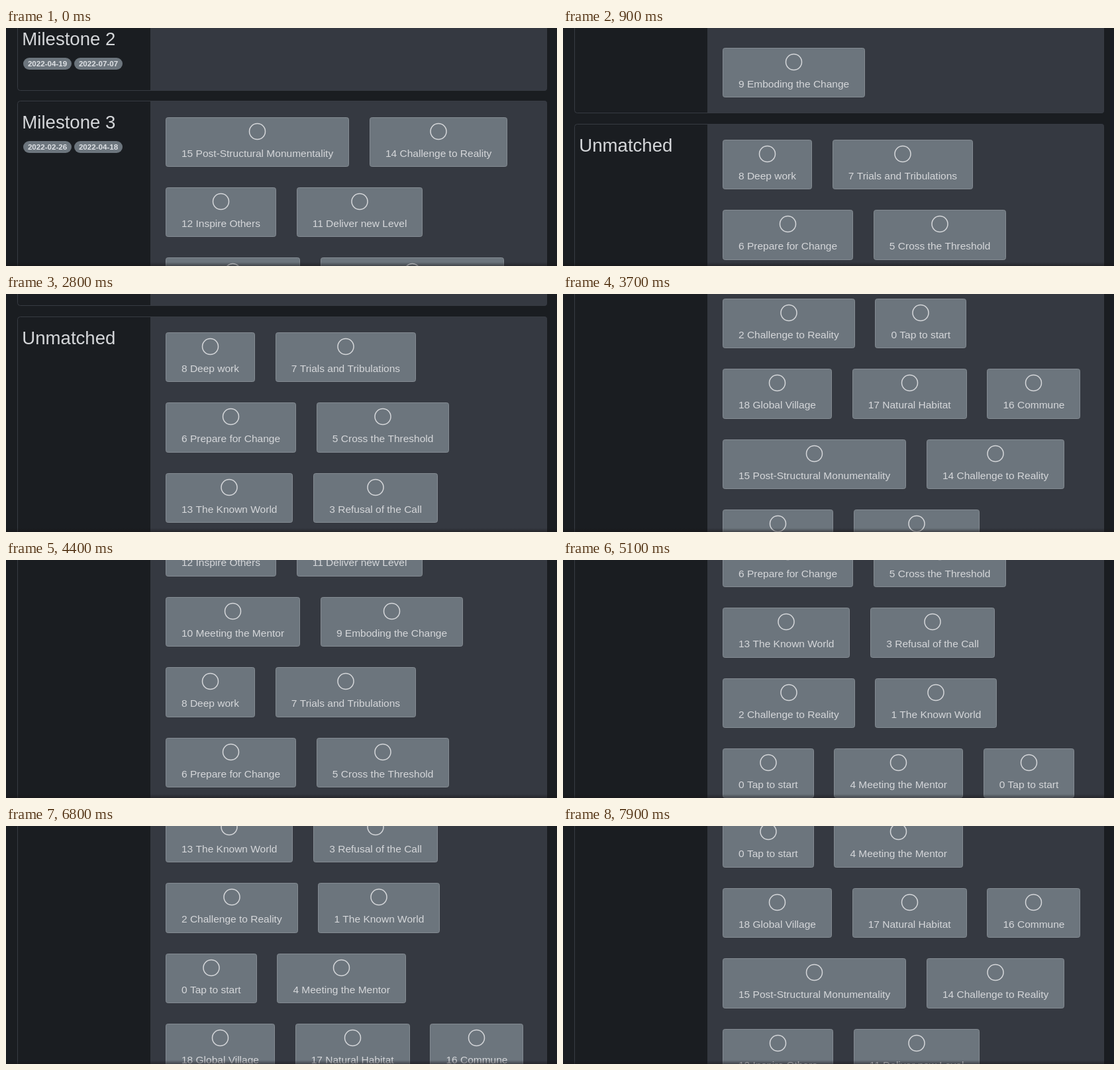
Animation, 832 px wide and 360 px high, one loop 8000 ms. Source, as an HTML page with a canvas:

```html
<!DOCTYPE html>
<html lang="en">
<head>
<meta charset="utf-8">
<title>Milestones</title>
<style>
html, body { margin: 0; width: 100%; height: 100%; overflow: hidden; background: #1a1d21; }
canvas { display: block; }
</style>
</head>
<body>
<canvas id="stage" width="832" height="360"></canvas>
<script>
const ctx = document.getElementById('stage').getContext('2d');
const FAMILY = '"Liberation Sans", Arial, sans-serif';
const CARD_FONT = '15.5px ' + FAMILY;
const TITLE_FONT = '27.6px ' + FAMILY;
const BADGE_FONT = 'bold 11.6px ' + FAMILY;
const PAGE = '#1a1d21', BODY = '#353941', CARD = '#6c757d', EDGE = '#848b92', INK = '#d5d7da';
const LOOP = 8000, STEP = 100;
const PITCH = 106.4, CARD_H = 75.5, PAD = 24.2, GAP = 30.8, LEFT = 241, RIGHT = 795;

const issues = [
  '18 Global Village', '17 Natural Habitat', '16 Commune',
  '15 Post-Structural Monumentality', '14 Challenge to Reality',
  '12 Inspire Others', '11 Deliver new Level',
  '10 Meeting the Mentor', '9 Emboding the Change',
  '8 Deep work', '7 Trials and Tribulations',
  '6 Prepare for Change', '5 Cross the Threshold',
  '13 The Known World', '3 Refusal of the Call',
  '2 Challenge to Reality', '1 The Known World',
  '0 Tap to start', '4 Meeting the Mentor'
];
const tap = issues[17];

// Flow cards from left to right, wrapping at the panel's edge.
function flow(labels) {
  ctx.font = CARD_FONT;
  let x = LEFT, row = 0;
  return labels.map(label => {
    const w = ctx.measureText(label).width + 48;
    if (x > LEFT && x + w > RIGHT) { x = LEFT; row++; }
    const card = { label, x, w, row };
    x += w + GAP;
    return card;
  });
}

const panels = [
  { title: 'Milestone 2', top: -16, bottom: 95.2, dates: ['2022-04-19', '2022-07-07'], cards: [] },
  { title: 'Milestone 3', top: 110.8, bottom: 553.4, dates: ['2022-02-26', '2022-04-18'],
    cards: flow([...issues.slice(3, 8), '13 Post-Structural Monumentality', issues[8]]) },
  { title: 'Unmatched', top: 569, bottom: 5200, dates: [],
    cards: flow([...issues.slice(9, 16), tap, ...issues, tap, ...issues, ...issues, ...issues]) }
];

// [time, scroll position, eased]
const keys = [
  [0, 0], [400, 212, true], [500, 212], [900, 424, true],
  [1500, 424], [1900, 530, true], [2700, 530], [2800, 535],
  [3000, 636], [3100, 636], [3700, 905.2], [4000, 1104],
  [4900, 1504], [5100, 1584.6], [6800, 2634.6], [7000, 3034],
  [7100, 3034], [7300, 3245], [7400, 3245], [7900, 3797.4]
];

function scrollAt(t) {
  const i = keys.findIndex(k => k[0] >= t);
  if (i <= 0) return keys[0][1];
  const [t0, y0] = keys[i - 1], [t1, y1, eased] = keys[i];
  let p = (t - t0) / (t1 - t0);
  if (eased) p = p * p * (3 - 2 * p);
  return y0 + (y1 - y0) * p;
}

function box(x, y, w, h, r, fill, stroke) {
  ctx.beginPath();
  ctx.roundRect(x, y, w, h, r);
  if (fill) { ctx.fillStyle = fill; ctx.fill(); }
  if (stroke) { ctx.strokeStyle = stroke; ctx.lineWidth = 1; ctx.stroke(); }
}

function write(text, x, y, font, color) {
  ctx.font = font;
  ctx.fillStyle = color;
  ctx.fillText(text, x, y);
}

function drawCard(card, y) {
  const top = Math.floor(y), h = Math.floor(y + CARD_H) - top;
  const x = Math.round(card.x), w = Math.round(card.x + card.w) - x;
  box(x + 0.5, top + 0.5, w - 1, h - 1, 3, CARD, EDGE);
  ctx.beginPath();
  ctx.arc(x + w / 2, top + 21.5, 12, 0, Math.PI * 2);
  ctx.strokeStyle = INK;
  ctx.lineWidth = 1.5;
  ctx.stroke();
  write(card.label, card.x + 24, top + 60, CARD_FONT, INK);
}

function drawPanel(panel, scroll) {
  const top = Math.floor(panel.top - scroll), bottom = Math.floor(panel.bottom - scroll);
  if (bottom < 0 || top > 360) return;
  box(218, top, 599, bottom - top, [0, 4, 4, 0], BODY);
  box(17.5, top + 0.5, 799, bottom - top - 1, 4, null, '#373b42');
  write(panel.title, 24.3, top + 42, TITLE_FONT, INK);
  panel.dates.forEach((date, i) => {
    const x = 26 + i * 77;
    box(x, top + 61, 73, 18, 9, CARD);
    write(date, x + 6.9, top + 74, BADGE_FONT, '#dde0e4');
  });
  for (const card of panel.cards) {
    const y = panel.top + PAD + card.row * PITCH - scroll;
    if (y > -80 && y < 361) drawCard(card, y);
  }
}

const shade = ctx.createLinearGradient(0, 354, 0, 360);
shade.addColorStop(0, 'rgba(22,20,22,0)');
shade.addColorStop(1, 'rgba(22,20,22,0.5)');

function draw(now) {
  const t = Math.floor((now % LOOP) / STEP) * STEP;
  const scroll = scrollAt(t);
  ctx.fillStyle = PAGE;
  ctx.fillRect(0, 0, 832, 360);
  panels.forEach(panel => drawPanel(panel, scroll));
  ctx.fillStyle = shade;
  ctx.fillRect(0, 354, 832, 6);
}

let start;
function tick(now) {
  start ??= now;
  draw(now - start);
  requestAnimationFrame(tick);
}
draw(0);
requestAnimationFrame(tick);
</script>
</body>
</html>
```
